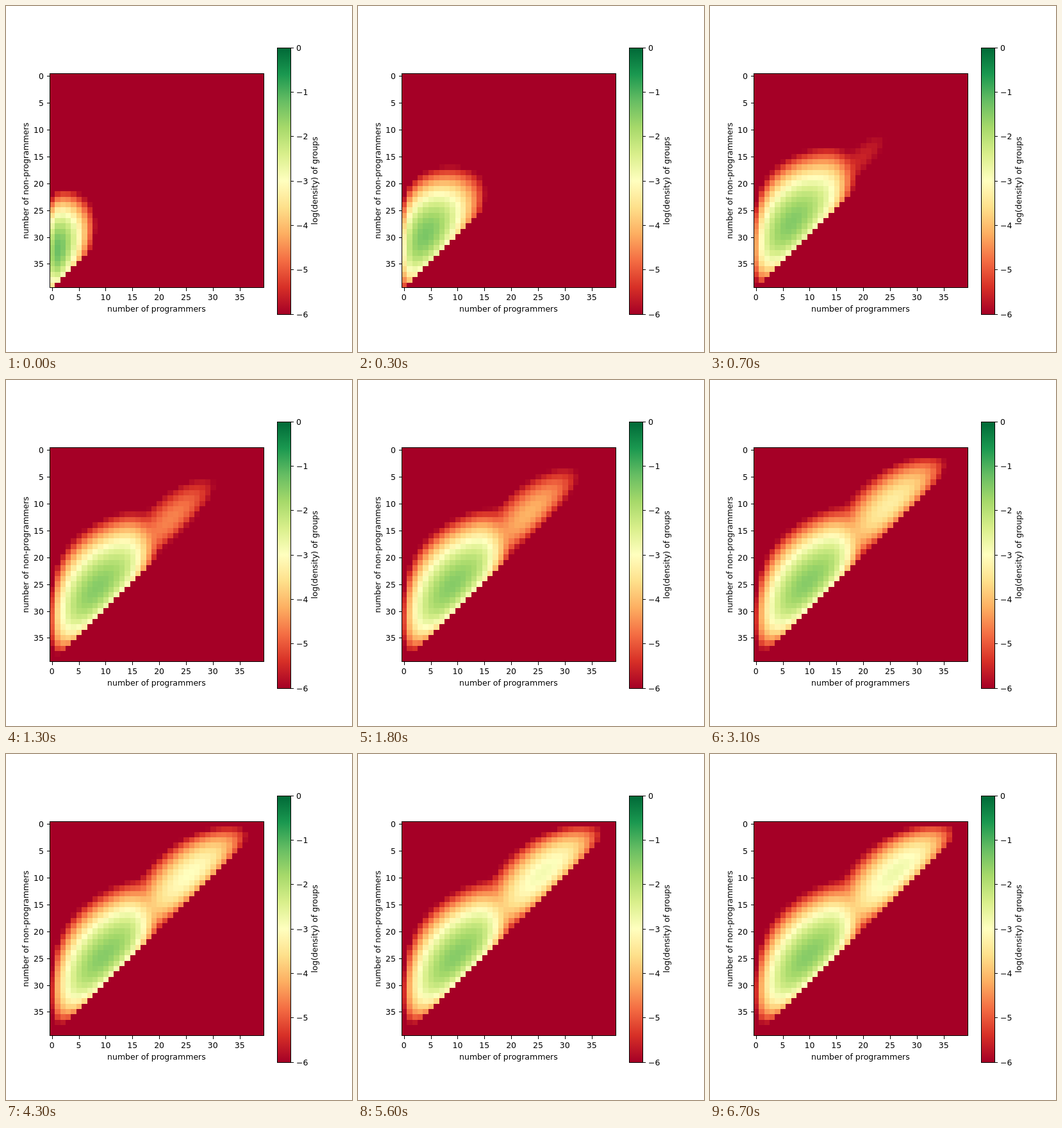
These frames come from a looping animation (540 px wide and 540 px high, 8 s). An HTML page with a canvas:

```html
<!DOCTYPE html>
<html lang="en">
<head>
<meta charset="utf-8">
<title>Density of groups</title>
<style>
html, body { margin: 0; width: 100%; height: 100%; overflow: hidden; background: #fff; }
canvas { display: block; width: 540px; height: 540px; }
</style>
</head>
<body>
<canvas id="stage" width="540" height="540"></canvas>
<script>
const ctx = document.getElementById('stage').getContext('2d');
const LOOP = 8000, GRID = 100, STEP = 150, N = 40;

// Red-yellow-green scale for log density -6 ... 0
const SCALE = ['a50026', 'd73027', 'f46d43', 'fdae61', 'fee08b', 'ffffbf',
  'd9ef8b', 'a6d96a', '66bd63', '1a9850', '006837'];
const RGB = SCALE.map(h => [0, 2, 4].map(i => parseInt(h.substr(i, 2), 16)));

const edgeX = i => Math.ceil(67.5 + 8.375 * i);
const edgeY = j => Math.floor(105.4 + 8.375 * j);
const snap = v => Math.floor(v + .5);

function color(v) {
  const u = Math.max(0, Math.min(1, (v + 6) / 6)) * 10;
  const i = Math.min(9, Math.floor(u));
  return `rgb(${RGB[i].map((c, k) => Math.round(c + (RGB[i + 1][k] - c) * (u - i)))})`;
}

// Poisson-like distance of a count from its expected value
const gap = (x, x0) => x > 0 ? x * Math.log(x / x0) - x + x0 : x0;

// Two peaks relax towards equilibrium: the main one fast, the second slowly
function densityAt(sec) {
  const fast = Math.exp(-sec / .72), slow = Math.exp(-sec / 1.75), sq = fast * fast;
  const p1 = 9.7 - 8.7 * fast, n1 = 24.5 + 7.8 * fast;
  const room = 40 + 6 * fast ** 1.5, e1 = room - p1 - n1;
  const p2 = 26.1 - 6.5 * slow - 7 * fast, n2 = 35 - p2;
  const top1 = -1.5 + .25 * sq, top2 = -2.65 - 4.1 * slow - 2 * sq;

  return (p, n) => {
    if (p + n >= N) return -6;
    const e = room - p - n;
    const main = top1 - (.38 + .06 * fast) * gap(p, p1)
      - (.3 + .5 * sq) * gap(n, n1) - (.42 + .38 * sq) * gap(e, e1)
      - .01 * (p - p1) * (e - e1) - .032 * Math.max(0, p - 13) ** 2;
    const second = top2 - .434 * gap(p, p2) - .32 * gap(n, n2)
      - .45 * gap(N - p - n, N - p2 - n2);
    return Math.log10(10 ** main + 10 ** second);
  };
}

function text(str, x, y, align, turned) {
  ctx.save();
  ctx.translate(x, y);
  if (turned) ctx.rotate(-Math.PI / 2);
  ctx.textAlign = align;
  ctx.fillText(str, 0, 0);
  ctx.restore();
}

function drawAxes() {
  ctx.fillStyle = ctx.strokeStyle = '#000';
  ctx.lineWidth = 1;
  ctx.font = '12.5px "DejaVu Sans", sans-serif';
  ctx.strokeRect(68.5, 105.5, 334, 334);
  ctx.strokeRect(423.5, 65.5, 21, 416);
  for (let v = 0; v < N; v += 5) {
    const x = 67.5 + 8.37 * (v + .5), y = 105.3 + 8.37 * (v + .5);
    ctx.fillRect(snap(x), 440, 1, 5);
    ctx.fillRect(64, snap(y), 4, 1);
    text(v, x, 459, 'center');
    text(v, 59, snap(y + 5), 'right');
  }
  for (let v = 0; v <= 6; v++) {
    const y = 64.8 + 69.3 * v;
    ctx.fillRect(445, snap(y), 4, 1);
    text(v ? '\u2212' + v : '0', 453, snap(y + 5), 'left');
  }
  text('number of programmers', 234.9, 477, 'center');
  text('number of non-programmers', 35, 272.7, 'center', true);
  text('log(density) of groups', 486, 272.7, 'center', true);
}

function draw(t) {
  // The model advances in whole steps, shown on a coarser clock
  const shown = Math.floor(t / GRID) * GRID;
  const step = Math.floor((shown + GRID / 2) / STEP);
  const density = densityAt(step * STEP / 1000);

  ctx.fillStyle = '#fff';
  ctx.fillRect(0, 0, 540, 540);
  for (let n = 0; n < N; n++) for (let p = 0; p < N; p++) {
    ctx.fillStyle = color(density(p, n));
    const x = edgeX(p), y = edgeY(n);
    ctx.fillRect(x, y, edgeX(p + 1) - x, edgeY(n + 1) - y);
  }
  const bar = ctx.createLinearGradient(0, 480.6, 0, 64.8);
  SCALE.forEach((h, i) => bar.addColorStop(i / 10, '#' + h));
  ctx.fillStyle = bar;
  ctx.fillRect(423, 65, 22, 417);
  drawAxes();
}

const start = performance.now();
function tick() {
  draw((performance.now() - start) % LOOP);
  requestAnimationFrame(tick);
}
tick();
</script>
</body>
</html>
```
